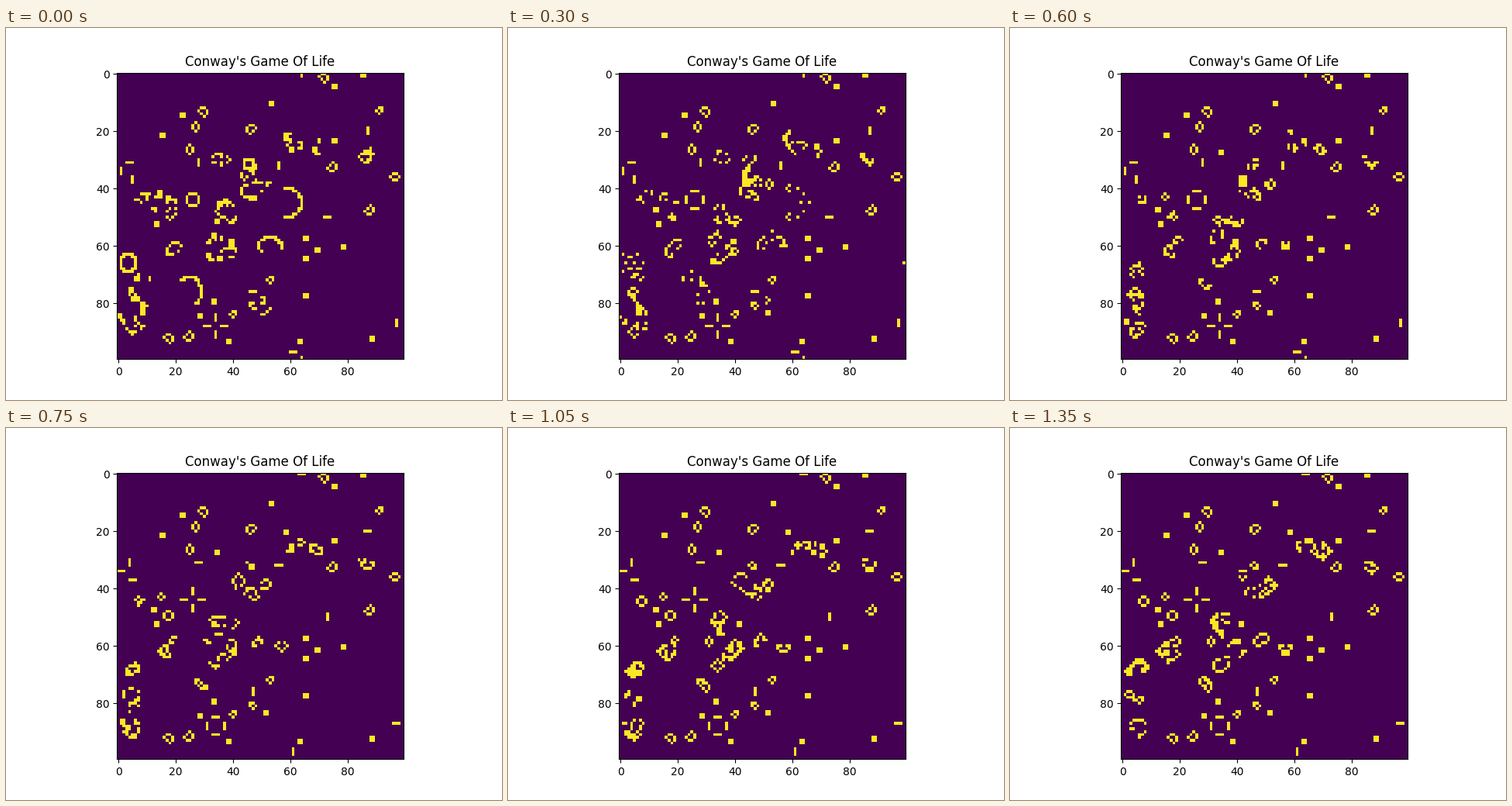
These frames come from a looping animation (640x480 px, 1.5 s). A matplotlib script:

```python
import numpy as np
import matplotlib.pyplot as plt
from matplotlib.animation import FuncAnimation

SIZE, STEPS, INTERVAL = 100, 10, 150
rng = np.random.default_rng(7)
grid = np.zeros((SIZE, SIZE), int)
ys, xs = np.mgrid[:SIZE, :SIZE]


def step(g):
    n = sum(np.roll(g, (dy, dx), (0, 1))
            for dy in (-1, 0, 1) for dx in (-1, 0, 1) if dx or dy)
    return ((n == 3) | ((g == 1) & (n == 2))).astype(int)


def shape(*rows):
    return np.array([[c == "O" for c in r] for r in rows], int)


BLOCK = np.ones((2, 2), int)
HIVE = shape(".OO.", "O..O", ".OO.")
LOAF = shape(".OO.", "O..O", ".O.O", "..O.")
BOAT = shape(".OO", "O.O", ".O.")
ROW = np.ones((1, 3), int)
RING = shape(".OOO.", "O...O", "O...O", "O...O", ".OOO.")


def place(pattern, *spots):
    """Stamp a pattern with its top left cell on each (x, y) spot."""
    py, px = np.nonzero(pattern)
    for x, y in spots:
        grid[(py + y) % SIZE, (px + x) % SIZE] = 1


def soup(cx, cy, rx, ry, density=0.45, age=2):
    """Random cells in an ellipse, left to settle for a few steps."""
    r = np.hypot((xs - cx) / rx, (ys - cy) / ry)
    g = ((r < 0.8) & (rng.random(grid.shape) < density)).astype(int)
    for _ in range(age):
        g = step(g)
    grid[(r < 1.1) & (g == 1)] = 1


def arc(cx, cy, rx, ry, start=0, end=360):
    """Cells along part of an ellipse, angles clockwise from the right."""
    t = np.radians(np.linspace(start, end, 80))
    x = np.round(cx + rx * np.cos(t)).astype(int)
    y = np.round(cy + ry * np.sin(t)).astype(int)
    grid[y, x] = 1


def traffic_light(cx, cy, gap=3):
    for d in (-gap, gap):
        place(ROW, (cx + d - 1, cy))
        place(ROW.T, (cx, cy + d - 1))


# Active colonies
for cx, cy, rx, ry in [(61, 23, 5, 4), (70, 25, 3, 4), (87, 29, 3, 4),
                       (36, 30, 4, 3), (47, 38, 7, 7), (9, 42, 7, 5),
                       (17, 47, 6, 4), (37, 49, 5, 6), (36, 61, 7, 6),
                       (20, 62, 4, 4), (10, 73, 8, 3), (5, 83, 6, 9),
                       (50, 81, 4, 4)]:
    soup(cx, cy, rx, ry)

arc(59, 45, 5, 5, -100, 100)
arc(53, 60, 4, 3, 150, 380)
arc(25, 76, 4, 5, -130, 60)
arc(3.5, 66, 2.5, 3)
arc(45.5, 31.5, 1.5, 2)

# Still lifes
place(BLOCK, (85, 0), (75, 4), (53, 10), (22, 14), (15, 21), (75, 23),
      (65, 57), (69, 61), (78, 60), (65, 64), (65, 77), (13, 52),
      (38, 93), (63, 93), (88, 92), (33, 79), (28, 84))
place(HIVE, (95, 35))
place(HIVE.T, (26, 17), (24, 25))
place(LOAF, (70, 0), (28, 12), (16, 91))
place(np.fliplr(LOAF), (45, 18))
place(np.flipud(LOAF), (73, 31), (86, 46), (23, 90))
place(BOAT, (52, 71), (39, 83), (90, 12))

# Blinkers, and the ring that turns into four of them
place(ROW, (72, 50), (60, 97), (3, 31), (46, 76))
place(ROW.T, (64, 99), (97, 86), (56, 31), (87, 19), (1, 33), (5, 36), (28, 30))
traffic_light(34, 88)
place(RING, (24, 42))

states = [grid]
for _ in range(STEPS - 1):
    states.append(step(states[-1]))

fig, ax = plt.subplots(figsize=(6.4, 4.8), dpi=100)
ax.set_title("Conway's Game Of Life")
img = ax.imshow(states[0], cmap="viridis", vmin=0, vmax=1, interpolation="nearest")


def update(i):
    img.set_data(states[i])
    return [img]


anim = FuncAnimation(fig, update, frames=STEPS, interval=INTERVAL,
                     repeat=True, repeat_delay=0)
plt.show()
```
